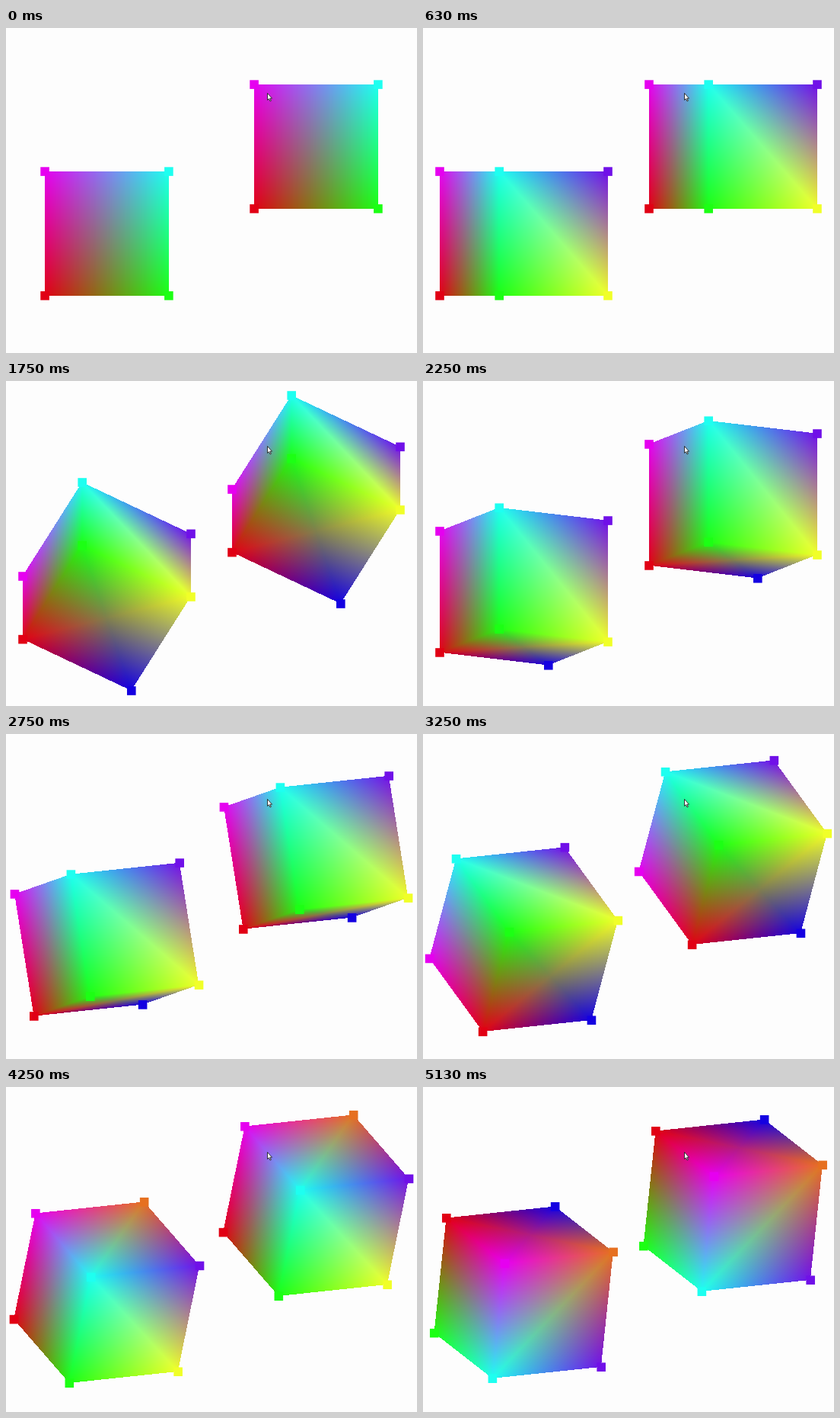
An HTML page with a canvas that plays this animation: 540x426 px, repeating every 5.26 s.

```html
<!DOCTYPE html>
<html lang="en">
<head>
<meta charset="utf-8">
<title>Rotating colour cubes</title>
<style>
html, body { margin: 0; width: 100%; height: 100%; overflow: hidden; background: #fdfdfd; }
canvas { display: block; width: 540px; height: 426px; }
</style>
</head>
<body>
<canvas id="stage" width="540" height="426"></canvas>
<script>
const LOOP = 5260, LAST = 41;
const HALF = 81.4, SIZE = 290, MID = 145.2, MARK = 11.6;

// Corner index bits: 1 = right, 2 = up, 4 = back
const COLORS = 'e10014 1cff14 e600f0 1efff0 1400e1 f0ff28 e67020 7010e8'
  .split(' ').map(hex => [0, 2, 4].map(i => parseInt(hex.substr(i, 2), 16)));

const ctx = document.getElementById('stage').getContext('2d');
const tile = document.createElement('canvas');
tile.width = tile.height = SIZE;
const tctx = tile.getContext('2d');
const img = tctx.createImageData(SIZE, SIZE);

const mean = vecs => vecs[0].map((_, k) => vecs.reduce((s, v) => s + v[k], 0) / vecs.length);
const ramp = (s, from, to) => Math.min(1, Math.max(0, (s - from) / (to - from)));

// Yaw, pitch, then spin about the cube's own depth axis
function poseAt(s) {
  return [
    61.3 * ramp(s, 0, 5),
    59.5 * ramp(s, 5.2, 13) - 70.6 * ramp(s, 14, 20),
    63.5 * ramp(s, 20.3, 26) - 84.8 * ramp(s, 26, 34) - 80.5 * ramp(s, 34, 35)
  ].map(deg => deg * Math.PI / 180);
}

// Cube axes as [screen x, screen y, towards the viewer]
function axesFor([yaw, pitch, spin]) {
  const { cos, sin } = Math;
  const tilt = ([x, y, d]) => [
    x, y * cos(pitch) - d * sin(pitch), d * cos(pitch) + y * sin(pitch)
  ];
  const x = tilt([cos(yaw), 0, sin(yaw)]);
  const y = tilt([0, -1, 0]);
  const z = tilt([sin(yaw), 0, -cos(yaw)]);
  return [
    x.map((v, i) => v * cos(spin) + y[i] * sin(spin)),
    y.map((v, i) => v * cos(spin) - x[i] * sin(spin)),
    z
  ];
}

function fillTriangle(a, b, c) {
  const [ax, ay] = a.pos, [bx, by] = b.pos, [cx, cy] = c.pos;
  const area = (bx - ax) * (cy - ay) - (cx - ax) * (by - ay);
  if (Math.abs(area) < 1e-6) return;
  const x0 = Math.floor(Math.min(ax, bx, cx)), x1 = Math.ceil(Math.max(ax, bx, cx));
  const y0 = Math.floor(Math.min(ay, by, cy)), y1 = Math.ceil(Math.max(ay, by, cy));
  for (let y = y0; y <= y1; y++) {
    for (let x = x0; x <= x1; x++) {
      const px = x + 0.5 - ax, py = y + 0.5 - ay;
      const v = (px * (cy - ay) - (cx - ax) * py) / area;
      const w = ((bx - ax) * py - px * (by - ay)) / area;
      const u = 1 - v - w;
      if (Math.min(u, v, w) < -1e-9) continue;
      const o = (y * SIZE + x) * 4;
      for (let k = 0; k < 3; k++) {
        img.data[o + k] = u * a.color[k] + v * b.color[k] + w * c.color[k];
      }
      img.data[o + 3] = 255;
    }
  }
}

// Four triangles around the middle; far sides fold along one diagonal
function fillFace(corners, folded) {
  const [, b, , d] = corners;
  const hub = {
    pos: mean(corners.map(p => p.pos)),
    color: mean((folded ? [b, d] : corners).map(p => p.color))
  };
  corners.forEach((p, i) => fillTriangle(hub, p, corners[(i + 1) % 4]));
}

function drawCube(step) {
  const axes = axesFor(poseAt(step));
  const points = COLORS.map((color, i) => ({
    color,
    pos: [0, 1].map(k => MID + HALF * axes.reduce(
      (sum, axis, bit) => sum + (i >> bit & 1 ? axis[k] : -axis[k]), 0))
  }));
  const seen = new Set();
  img.data.fill(0);
  axes.forEach((axis, k) => {
    if (Math.abs(axis[2]) < 1e-6) return;
    const far = axis[2] > 0;
    const base = far ? 1 << k : 0;
    const p = 1 << (k + 1) % 3, q = 1 << (k + 2) % 3;
    const corners = [base, base + p, base + p + q, base + q].map(i => points[i]);
    fillFace(corners, far);
    corners.forEach(c => seen.add(c));
  });
  tctx.putImageData(img, 0, 0);
  for (const { color, pos: [x, y] } of seen) {
    tctx.fillStyle = `rgb(${color})`;
    tctx.fillRect(x - MARK / 2 + 0.3, y - MARK / 2 + 0.3, MARK, MARK);
  }
}

const arrow = new Path2D('M343.5 85.5v9l2-1.8 1.5 3.3 1.4-.7-1.5-3.1h2.6z');

function drawCursor() {
  ctx.fillStyle = '#fff';
  ctx.strokeStyle = '#222';
  ctx.lineWidth = 0.9;
  ctx.fill(arrow);
  ctx.stroke(arrow);
}

// Eight steps a second, each starting on a whole 10 ms
function stepAt(t) {
  let i = Math.floor(t / 125);
  if (t < Math.round(12.5 * i) * 10) i--;
  return Math.min(Math.max(i, 0), LAST);
}

let shown = -1;
function render(t) {
  const step = stepAt(t % LOOP);
  if (step === shown) return;
  shown = step;
  drawCube(step);
  ctx.fillStyle = '#fdfdfd';
  ctx.fillRect(0, 0, 540, 426);
  ctx.drawImage(tile, -13, 124);
  ctx.drawImage(tile, 262, 10);
  drawCursor();
}

const start = performance.now();
function tick() {
  render(performance.now() - start);
  requestAnimationFrame(tick);
}
tick();
</script>
</body>
</html>
```
